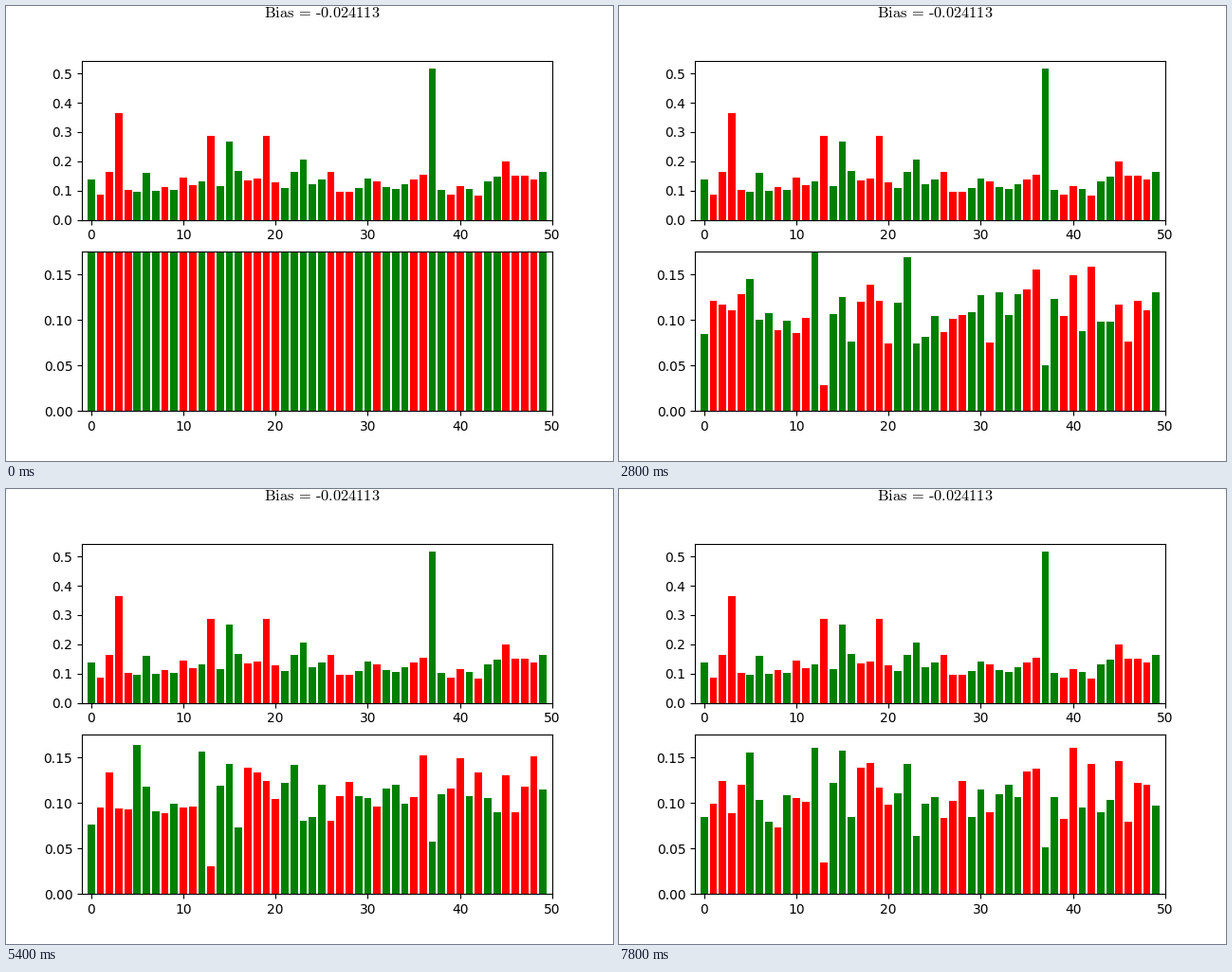
Recreate the animation shown at these times as a matplotlib script. Size 640 by 480 pixels, loop 8 s.

```python
import matplotlib.pyplot as plt
import numpy as np
from matplotlib.animation import FuncAnimation

FRAMES, STEP_MS = 40, 200
BARS = 50
SPREAD = 0.012

plt.rcParams["mathtext.fontset"] = "cm"

SIDES = ("GRRRRGGGRG" "RRGRGGGRRR" "RGGGGGRRRG"
         "GRGGGRRGGR" "RGRGGRRRRG")
COLORS = ["green" if s == "G" else "red" for s in SIDES]

# Heights in thousandths, ten bars per row
WEIGHTS = np.array([
    139, 85, 164, 365, 102, 97, 160, 99, 113, 103,
    145, 118, 131, 286, 116, 267, 167, 136, 142, 288,
    129, 109, 163, 206, 122, 139, 163, 96, 97, 110,
    142, 131, 111, 105, 122, 139, 154, 518, 103, 87,
    115, 105, 83, 132, 147, 199, 150, 150, 138, 164]) / 1000
MEANS = np.array([
    94, 118, 128, 100, 114, 142, 105, 106, 92, 107,
    90, 101, 162, 26, 116, 151, 87, 127, 127, 124,
    92, 105, 153, 73, 97, 110, 85, 99, 115, 117,
    109, 95, 112, 118, 113, 127, 148, 49, 104, 99,
    149, 104, 152, 94, 103, 131, 75, 118, 114, 111]) / 1000


def heights(n):
    """Bars start full, then jitter around values they settle on."""
    if n == 0:
        return np.ones(BARS)
    rng = np.random.default_rng(100 + n)
    level = MEANS.mean()
    center = level + (MEANS - level) * (1 - np.exp(-n / 2))
    sd = SPREAD * np.sqrt(center / level) * (1 + 3 * np.exp(1 - n))
    return np.clip(center + sd * rng.standard_normal(BARS), 0, 1)


fig, (top, low) = plt.subplots(2, 1, figsize=(6.4, 4.8), dpi=100)
fig.text(333 / 640, 1 - 12 / 480, r"$\text{Bias = -0.024113}$",
         size=11.75, ha="center", va="baseline")

x = np.arange(BARS)
top.bar(x, WEIGHTS, color=COLORS)
bars = low.bar(x, heights(0), color=COLORS)
top.set_ylim(0, 0.544)
low.set_ylim(0, 0.175)
low.set_yticks([0, 0.05, 0.1, 0.15])
for ax in (top, low):
    ax.set_xlim(-1, BARS)


def update(n):
    for bar, h in zip(bars, heights(n)):
        bar.set_height(h)
    return list(bars)


anim = FuncAnimation(fig, update, frames=FRAMES, interval=STEP_MS,
                     init_func=lambda: update(0), repeat=True,
                     repeat_delay=0)
plt.show()
```
